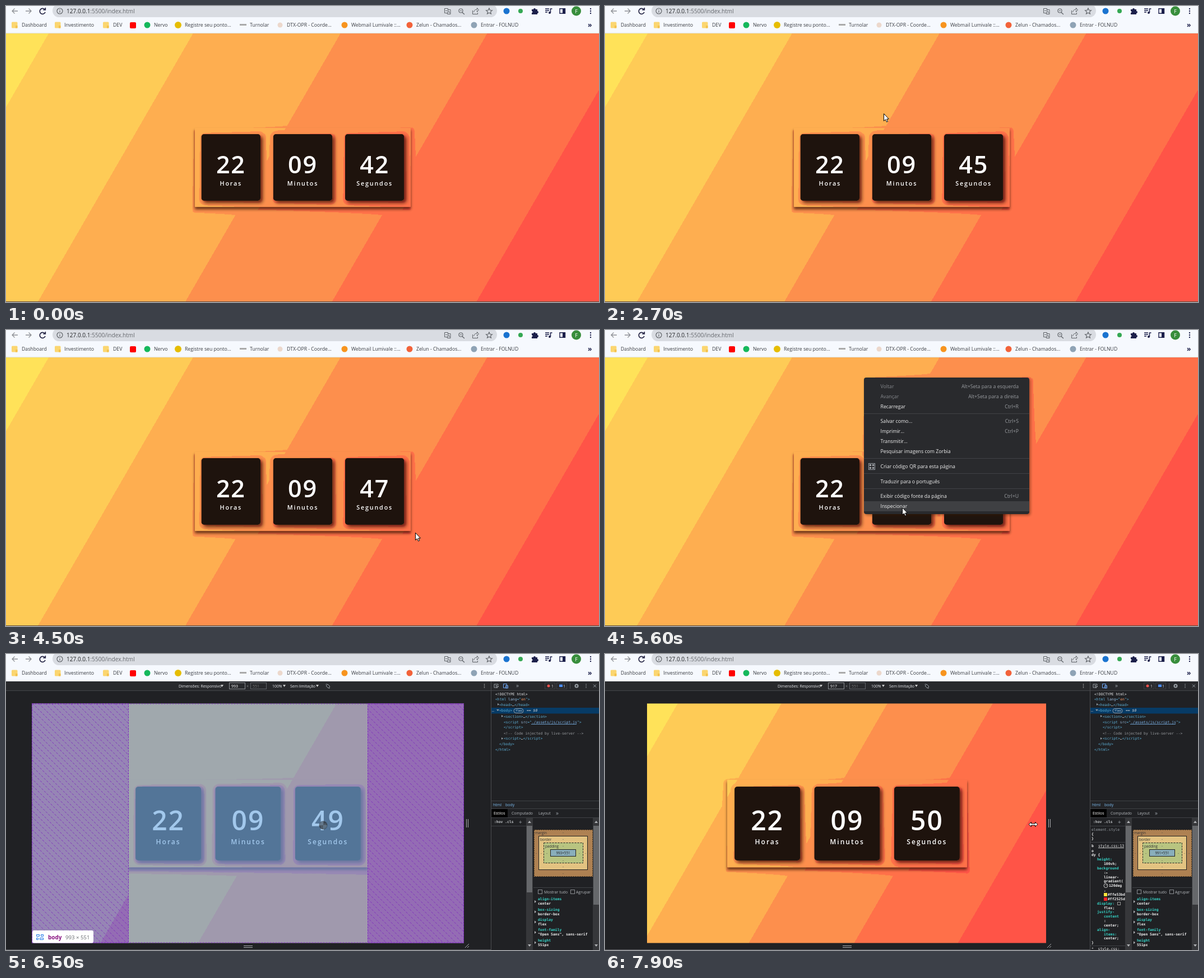
Animation, 1058 px wide and 529 px high, one loop 8000 ms. Source, as an HTML page with a canvas:

```html
<!DOCTYPE html>
<html lang="pt">
<head>
<meta charset="utf-8">
<style>
html, body { margin: 0; width: 100%; height: 100%; overflow: hidden; background: #202124; }
canvas { display: block; }
</style>
</head>
<body>
<canvas id="stage" width="1058" height="529"></canvas>
<script>
const g = document.getElementById('stage').getContext('2d');
const SANS = '"Open Sans", sans-serif', MONO = '"DejaVu Sans Mono", monospace';

// Colour bands of the 120deg gradient: [start, colour]
const PAGE = {
  bands: [[0, '#ffe259'], [.057, '#fecb56'], [.25, '#feae50'], [.447, '#fd8f4d'], [.643, '#ff7049'], [.836, '#ff5447']],
  card: '#1e130d', ink: '#fff', shade: 'rgba(50,18,0,.75)', depth: .17
};
const HIGHLIGHT = {
  bands: [[0, '#a0a8ad'], [.534, '#a099ad'], [.84, '#9788b4']],
  card: '#537598', ink: '#a2c8ec', shade: 'rgba(70,105,145,.6)', depth: .6
};
const SIDES = [[0, '#9685b5'], [.363, '#946cb4']];
const MENU = [462, 85, 295, 244, 4];

// Pointer keys: time, x, y
const POINTER = [
  [300, 12, 3], [1100, 346, 184], [1200, 346, 184], [1300, 349, 184], [1400, 349, 184],
  [2300, 454, 190], [2400, 454, 190], [2700, 497, 192], [3300, 586, 245], [3400, 586, 245],
  [4000, 757, 338], [4100, 758, 330], [4200, 758, 330], [4500, 730, 362], [4600, 730, 362],
  [5200, 531, 324], [5300, 531, 324], [5400, 462, 329], [5600, 530, 317], [6300, 530, 318],
  [6500, 566, 306], [7300, 806, 304], [7400, 806, 304], [7600, 823, 304], [7700, 823, 304], [7900, 764, 304]
];

function text(str, x, y, color, size = 8.7, o = {}) {
  g.font = `${o.weight || 400} ${size}px ${o.font || SANS}`;
  g.textAlign = o.align || 'left';
  g.letterSpacing = (o.spacing || 0) + 'px';
  g.fillStyle = color;
  g.fillText(str, x, y);
  return x + g.measureText(str).width;
}
const code = (x, y, ...parts) => {
  for (let i = 0; i < parts.length; i += 2) x = text(parts[i + 1], x, y + 2.3, parts[i], 6.4, { font: MONO });
};
const bold = (str, x, y, color) => text(str, x, y + 2.3, color, 6.4, { font: MONO, weight: 700 });
const rect = (x, y, w, h, color) => { g.fillStyle = color; g.fillRect(x, y, w, h); };
const frame = (x, y, w, h, color, dash = []) => {
  g.setLineDash(dash); g.lineWidth = 1; g.strokeStyle = color;
  g.strokeRect(x + .5, y + .5, w - 1, h - 1); g.setLineDash([]);
};
const round = (x, y, w, h, r, color) => {
  g.beginPath(); g.roundRect(x, y, w, h, r); g.fillStyle = color; g.fill();
};
const dot = (x, y, r, color) => round(x - r, y - r, 2 * r, 2 * r, r, color);
const line = (d, color, width = 1) => { g.strokeStyle = color; g.lineWidth = width; g.stroke(new Path2D(d)); };
const solid = (d, color) => { g.fillStyle = color; g.fill(new Path2D(d)); };
const dots = (x, y, gap, r, color) => { for (const k of [-1, 0, 1]) dot(x, y + k * gap, r, color); };

function bandFill(v, bands, shift = 0) {
  const len = .866 * v.w + .5 * v.h, clamp = p => Math.min(1, Math.max(0, p - shift));
  const fill = g.createLinearGradient(v.x, v.y, v.x + .866 * len, v.y + .5 * len);
  bands.forEach(([start, color], i) => {
    fill.addColorStop(clamp(start), color);
    fill.addColorStop(clamp(i + 1 < bands.length ? bands[i + 1][0] : 2), color);
  });
  return fill;
}

function outside([x, y, w, h, r], paint) {
  const p = new Path2D();
  p.rect(0, 0, 1058, 529);
  p.roundRect(x, y, w, h, r);
  g.save();
  g.clip(p, 'evenodd');
  paint();
  g.restore();
}

// The bands creep forward near a box, as if darkened by a soft shadow.
function halo(v, bands, box, dx, dy, depth) {
  const [x, y, w, h, r] = box;
  outside(box, () => {
    for (let k = 1; k <= 10; k++) {
      const e = 10 - k;
      round(x + dx - e, y + dy - e, w + 2 * e, h + 2 * e, r + e, bandFill(v, bands, depth * (k / 10) ** 1.5));
    }
  });
}

function shadow(box, dx, dy, blur, color) {
  const [x, y, w, h, r] = box, away = 2000;
  outside(box, () => {
    g.shadowColor = color; g.shadowBlur = blur;
    g.shadowOffsetX = dx + away; g.shadowOffsetY = dy;
    round(x - away, y, w, h, r, '#000');
  });
}

function clock(v, theme, s, cx, cy, sec) {
  g.save();
  g.beginPath(); g.rect(v.x, v.y, v.w, v.h); g.clip();
  const w = 117 * s, h = 132 * s, pitch = 142.4 * s, top = cy - h / 2;
  const cw = 428 * s, ch = 157 * s, panel = [cx - cw / 2, cy - ch / 2, cw, ch, 1];
  halo(v, theme.bands, panel, 0, 6 * s, theme.depth);
  shadow(panel, 0, 4, 5, theme.shade);
  [['22', 'Horas'], ['09', 'Minutos'], [String(sec), 'Segundos']].forEach(([num, label], i) => {
    const mid = cx + (i - 1) * pitch, o = { weight: 600, align: 'center', spacing: 2 * s };
    const card = [mid - w / 2, top, w, h, 5 * s];
    halo(v, theme.bands, card, 2, 2, theme.depth * 1.6);
    shadow(card, 4, 4, 6, theme.shade);
    round(...card, theme.card);
    text(num, mid, top + 77.7 * s, theme.ink, 48 * s, o);
    text(label, mid, top + 102.5 * s, theme.ink, 12 * s, o);
  });
  g.restore();
}

function toolbar() {
  const dark = '#1b1f4a', gray = '#5f6368';
  rect(0, 0, 1058, 49, '#f6f9fe');
  rect(0, 48, 1058, 1, '#dfe2e8');
  round(83, -3, 793, 23, 11.5, '#d9dce2');
  line('M21 9H11M15.5 4.5 11 9l4.5 4.5M35 9H45M40.5 4.5 45 9l-4.5 4.5', '#8d9095', 1.3);
  line('M69 6A5 5 0 1 0 70 11M70.3 3v4h-4', '#202040', 1.7);
  line('M101 9a5 5 0 1 0-10 0a5 5 0 1 0 10 0M96 8.5v3.3M96 6v1.2', gray, 1.2);
  text(':5500/index.html', text('127.0.0.1', 108, 13, '#26282b', 10.05), 13, '#66696e', 10.05);
  line('M782.5 4.5h6v8h-6zM788.5 6.5h4.5v8h-5.5l-1-2M784 8.5h3M790 9l2 4', gray);
  line('M815 8.5a3.5 3.5 0 1 0-7 0a3.5 3.5 0 1 0 7 0M814 11.5l4 3.5M810 8.5h3', gray, 1.2);
  line('M832.5 8v6.5h9V12M834.5 11q1-5 6-5V3.5l3 3.5-3 3.5V8', gray);
  line('M862 4l1.6 3.5 3.8.4-2.9 2.5.9 3.7-3.4-2-3.4 2 .9-3.7-2.9-2.5 3.8-.4z', gray, 1.2);
  dot(893, 9, 5.5, '#1a73d0');
  dot(918, 9, 4, '#34a853');
  solid('M938 6h3a2 2 0 1 1 4 0h3v3a2 2 0 1 1 0 4v2h-10v-3a1.5 1.5 0 1 0 0-3z', dark);
  line('M962 5h7M962 8h7M962 11h4M971.5 12V5h3', dark, 1.5);
  dot(970, 12, 2, dark);
  line('M988 4.7h9.5v8.6h-9.5z', dark, 1.4);
  rect(993, 4, 5, 10, dark);
  dot(1017.5, 9, 8.5, '#388e3c');
  text('F', 1017.5, 12.5, '#fff', 9.5, { align: 'center' });
  dots(1043, 9, 4, 1.2, dark);

  for (const x of [10, 87, 173]) {
    round(x, 28.5, 10.5, 11, 1.5, '#fbd670');
    rect(x + 7, 35, 3.5, 4.5, '#f3c14d');
  }
  round(221, 29, 11, 11, 2, '#f00');
  dot(252, 34, 5.5, '#15b85c');
  dot(307, 34, 6, '#e6bd00');
  rect(417, 32, 12, 3, '#aaa');
  dot(489, 34, 4.5, '#ecd8cc');
  dot(604, 34, 5.5, '#f7941e');
  dot(720, 34, 5.5, '#f2623a');
  dot(835, 34, 5.5, '#8fa3b5');
  [['Dashboard', 28], ['Investimento', 104], ['DEV', 191], ['Nervo', 264], ['Registre seu ponto...', 319],
   ['Turnolar', 435], ['DTX-OPR - Coorde...', 501], ['Webmail Lumivale ::...', 616],
   ['Zelun - Chamados...', 732], ['Entrar - FOLNUD', 847]].forEach(([s, x]) => text(s, x, 37, '#3a3d42'));
  text('»', 1038, 38, dark, 12, { weight: 700 });
}

function menu() {
  shadow(MENU, 2, 2, 5, 'rgba(60,25,0,.5)');
  round(...MENU, '#292a2d');
  rect(462, 306, 295, 18, '#3f4043');
  for (const y of [149, 229, 256, 283]) rect(462, y, 295, 1, '#414246');
  [['Voltar', 101, 'Alt+Seta para a esquerda'], ['Avançar', 119, 'Alt+Seta para a direita'],
   ['Recarregar', 137, 'Ctrl+R'], ['Salvar como...', 163, 'Ctrl+S'], ['Imprimir...', 181, 'Ctrl+P'],
   ['Transmitir...', 199], ['Pesquisar imagens com Zorbia', 217], ['Criar código QR para esta página', 244],
   ['Traduzir para o português', 271], ['Exibir código fonte da página', 297, 'Ctrl+U'], ['Inspecionar', 315]
  ].forEach(([label, y, keys = '']) => {
    text(label, 491.5, y + 3, y < 130 ? '#85888c' : '#f1f1f1', 8.75);
    text(keys, 738, y + 3, '#9a9da1', 8.75, { align: 'right' });
  });
  frame(470, 238, 12, 12, '#9aa0a6');
  for (const x of [472, 477]) for (const y of [240, 245]) frame(x, y, 3, 3, '#bdc1c6');
}

function deviceBar(v, width) {
  const ink = '#e8eaed', right = v.x + v.w;
  rect(0, 49, 1058, 480, '#202124');
  rect(0, 49, 1058, 16, '#28292c');
  rect(0, 65, 1058, 1, '#44464a');
  rect(865, 49, 1, 480, '#4a4c50');
  text('Dimensões: Responsivo', 308, 59.5, ink, 6.9);
  text('100%', 475, 59.5, ink, 6.9);
  text('Sem limitação', 507, 59.5, ink, 6.9);
  for (const x of [383, 494, 553]) solid(`M${x} 55h5l-2.5 4z`, '#ccc');
  frame(398, 51, 29, 12, '#8a8d91');
  frame(436, 51, 29, 12, '#5f6368');
  text(width, 402, 59.5, '#fff', 6.9);
  text('×', 429, 59.5, '#888', 6.9);
  text('551', 440, 59.5, '#777', 6.9);
  line('M571 57l3-3 4 4-3 3zM570.5 55l2-2M578 60l-2 2', '#9aa0a6');
  dots(853.5, 57, 2.8, .8, '#bbb');
  line(`M${right + 4.5} 295v15M${right + 7.5} 295v15M424 521.5h16M424 524.5h16`, '#a9abae');
  line(`M${right + 2} 525l7-7M${right + 6} 525l3-3`, '#a9abae');
  rect(0, 528, 865, 1, '#55575b');
}

function inspector(loaded) {
  const ink = '#e8eaed', icon = '#9aa0a6';
  line('M877 60h-6v-6h7v2M874 56l5 2-2 .8-1 2z', icon);
  line('M887.5 53.5h6v7h-6zM891.5 56.5h4v4.5h-4z', '#6ea8f7');
  dot(1018, 57, 3.5, icon); dot(1018, 57, 1.5, '#28292c');
  dots(1035, 57, 2.8, .8, icon);
  line('M1048 54.5l5 5M1053 54.5l-5 5', icon);
  if (!loaded) {
    rect(906, 49, 45, 16, '#000');
    text('Elementos', 912, 59.5, ink, 6.8);
    text('»', 956, 60, icon, 10);
    return;
  }
  text('»', 910, 60, icon, 10);
  frame(961, 51, 19, 12, '#3c4043'); dot(968, 57, 2.5, '#f0524d'); text('1', 973, 59.5, ink, 6.8);
  frame(982, 51, 19, 12, '#3c4043'); rect(987, 54.5, 6, 4.5, '#4c8df6'); text('1', 994, 59.5, ink, 6.8);
  rect(1006, 52, 1, 10, '#4a4c50');

  const tag = '#5db0d7', attr = '#9bbbdc', str = '#f29766', link = '#7fb8f0';
  rect(866, 96, 192, 10.5, '#073b66');
  code(873, 72, ink, '<!DOCTYPE html>');
  code(873, 81, tag, '<html ', attr, 'lang', tag, '="', str, 'en', tag, '">');
  code(880, 91, tag, '<head>', ink, '…', tag, '</head>');
  code(867, 101, '#aaa', '…');
  code(880, 101, tag, '<body>');
  g.beginPath(); g.roundRect(906, 97.5, 17, 8, 4); g.strokeStyle = '#9aa0a6'; g.stroke();
  text('flex', 909, 103.3, ink, 5, { font: MONO });
  text('== $0', 929, 103.3, '#d0d4d8', 6.4, { font: MONO, weight: 'italic' });
  code(888, 112, tag, '<section>', ink, '…', tag, '</section>');
  code(888, 122, tag, '<script ', attr, 'src', tag, '="', link, './assets/js/script.js', tag, '">');
  rect(937, 125, 81, .8, link);
  code(888, 131, tag, '</' + 'script>');
  code(888, 142, '#9a9da1', '<!-- Code injected by live-server -->');
  code(888, 151, tag, '<script>', ink, '…', tag, '</' + 'script>');
  code(880, 161, tag, '</body>');
  code(873, 171, tag, '</html>');
  for (const [x, y] of [[877, 90], [884, 111], [884, 151]]) solid(`M${x} ${y - 2}l3 2-3 2z`, icon);
  solid('M875 99h5l-2.5 3z', icon);

  rect(866, 262, 192, 14, '#232427');
  for (const y of [262, 276, 292]) rect(866, y, 192, 1, '#3f4145');
  text('html', 869, 272, '#7cbcf0', 7);
  text('body', 891, 272, '#7cbcf0', 7);
  rect(866, 277, 29, 15, '#000');
  text('Estilos', 870, 287, '#fff', 6.9);
  text('Computado', 902, 287, '#b4b8bc', 6.9);
  text('Layout', 950, 287, '#b4b8bc', 6.9);
  text('»', 981, 288, icon, 10);
  bold(':hov .cls', 871, 300, '#c4c7ca');
  text('+', 915, 304, icon, 10);
  rect(866, 307, 62, 1, '#3f4145');
  for (const [x, top, end] of [[928, 307, 426], [1047, 307, 448]]) {
    rect(x, 293, 12, 236, '#36373a');
    rect(x + 1, top, 10, end - top, '#66686b');
    solid(`M${x + 3} 302l3-4 3 4zM${x + 3} 519l3 4 3-4z`, '#b0b2b5');
  }
}

function boxModel(width) {
  rect(942, 314, 105, 84, '#ae8152'); frame(942, 314, 105, 84, '#4b3720', [2, 2]);
  rect(950, 325, 88, 61, '#e3c381'); frame(950, 325, 88, 61, '#222');
  rect(959, 337, 71, 37, '#b8c480'); frame(959, 337, 71, 37, '#222', [3, 2]);
  rect(971, 349, 46, 13, '#89aebb'); frame(971, 349, 46, 13, '#222');
  text('margin', 944, 322, '#333', 6.3);
  text('border', 953, 334, '#333', 6.3);
  text('padding', 962, 346, '#333', 6.3);
  text(width + '×551', 994, 357.8, '#222', 6.3, { align: 'center' });
  for (const [x, y] of [[994, 321], [994, 333], [994, 345], [994, 371], [994, 382], [994, 394], [946, 358],
    [955, 358], [965, 358], [1023, 358], [1034, 358], [1042, 358]]) text('-', x, y, '#444', 6.3, { align: 'center' });
  rect(941, 417, 106, 1, '#3f4145');
  frame(949, 421, 8, 8, '#8a8d91'); text('Mostrar tudo', 960, 428, '#b4b8bc', 6.9);
  frame(1007, 421, 8, 8, '#8a8d91'); text('Agrupar', 1017, 428, '#b4b8bc', 6.9);
  [['align-items', 'center'], ['box-sizing', 'border-box'], ['display', 'flex'],
   ['font-family', '"Open Sans", sans-serif'], ['height', '551px']].forEach(([name, value], i) => {
    const y = 438 + i * 18.3;
    bold(name, 949, y, '#35d4c7');
    bold(value, 949, y + 8, '#f0f0f0');
    solid(`M943 ${y + 2}l3 2.5-3 2.5z`, '#b0b2b5');
  });
}

function styles() {
  const name = '#35d4c7', ink = '#f0f0f0';
  g.save();
  g.beginPath(); g.rect(866, 308, 62, 221); g.clip();
  rect(866, 336, 62, 1, '#3f4145');
  rect(866, 521, 62, 1, '#3f4145');
  code(868, 314, '#9aa0a6', 'element.style');
  bold('{', 868, 322, ink);
  bold('}', 868, 330, ink);
  bold('b', 868, 343, ink);
  code(880, 343, ink, 'style.css:13');
  rect(880, 346, 46, .8, ink);
  [['o', 868, ink], ['dy {', 868, ink], ['height:', 878, name], ['100vh;', 890, ink],
   ['background', 878, name], [':▸', 890, ink], ['linear-', 890, ink], ['gradient(', 890, ink], ['120deg', 899, ink],
   [',', 890, ink], ['#ffe53bd', 897, ink], ['#ff2525d', 897, ink], ['display:', 878, name], ['flex;', 890, ink],
   ['justify-', 878, name], ['content', 890, name], [':', 890, ink], ['center;', 890, ink], ['align-', 878, name],
   ['items:', 890, name], ['center;', 890, ink], ['}', 868, ink]
  ].forEach(([str, x, color], i) => bold(str, x, 351.3 + i * 7.84, color));
  code(868, 527, ink, '*  style.css:');
  line('M897 414a3.5 3.5 0 1 0-7 0a3.5 3.5 0 1 0 7 0M893.5 414l2-2', '#ccc');
  rect(890, 427, 6, 6, '#ffe53b');
  rect(890, 435, 6, 6, '#ff2525');
  frame(914, 443, 6, 6, '#999');
  g.restore();
}

function flexOverlay(v) {
  const left = 219, right = 645, end = v.x + v.w, purple = '#8030bd';
  for (const [a, b] of [[v.x, left], [right, end]]) {
    rect(a, v.y, b - a, v.h, bandFill(v, SIDES));
    g.save();
    g.beginPath(); g.rect(a, v.y, b - a, v.h); g.clip();
    g.beginPath();
    for (let x = a - v.h; x < b; x += 11.3) { g.moveTo(x, v.y); g.lineTo(x + v.h, v.y + v.h); }
    g.setLineDash([4, 2.5]); g.lineWidth = 1; g.strokeStyle = purple; g.stroke();
    g.restore();
    frame(a, v.y, b - a, v.h, purple, [3, 2]);
  }
  frame(v.x, v.y, v.w, v.h, purple, [3, 2]);
  round(47, 494, 109, 22.5, 3, '#fff');
  line('M54.5 501.5h5v3h-5zM62.5 501.5h4v3h-4zM54.5 507.5h3v3h-3zM60.5 507.5h6v3h-6z', '#1a73e8');
  text('body', 75, 509.5, '#881280', 10, { weight: 700 });
  text('993 × 551', 106, 509.5, '#66696e', 9.6);
}

function pointer(t) {
  if (t < 300) return;
  let i = POINTER.findIndex(k => k[0] > t);
  if (i < 0) i = POINTER.length - 1;
  const [t0, x0, y0] = POINTER[i - 1], [t1, x1, y1] = POINTER[i];
  const f = Math.min(1, (t - t0) / (t1 - t0)), x = x0 + (x1 - x0) * f, y = y0 + (y1 - y0) * f;
  g.save();
  g.translate(Math.round(x), Math.round(y));
  if (t < 6100) {
    const arrow = 'M.5 .5V13.5L3.5 10.8 5.5 15.3 7.6 14.4 5.7 10H9.5z';
    solid(arrow, '#fff'); line(arrow, '#000');
  } else if (t < 6500) {
    line('M8 0A8 8 0 1 0-8 0A8 8 0 1 0 8 0', '#3a332c');
  } else if (t < 7500) {
    dot(0, 0, 7.5, 'rgba(50,55,60,.75)');
    solid('M0 0V-7A7 7 0 0 0-7 0zM0 0V7A7 7 0 0 0 7 0z', 'rgba(120,150,175,.5)');
  } else {
    const arrows = 'M-8 .5l4.5-4v2.5h7v-2.5l4.5 4-4.5 4v-2.5h-7v2.5z';
    solid(arrows, '#fff'); line(arrows, '#000');
  }
  g.restore();
}

function draw(t) {
  const sec = 42 + Math.floor((t + 500) / 1000);
  if (t < 6300) {
    const v = { x: 0, y: 49, w: 1058, h: 480 }, open = t >= 5400 && t < 5800;
    rect(v.x, v.y, v.w, v.h, bandFill(v, PAGE.bands));
    if (open) halo(v, PAGE.bands, MENU, 3, 2, .12);
    clock(v, PAGE, .9, 529.5, 288.5, sec);
    rect(0, 528, 1058, 1, '#5a4a3c');
    if (open) menu();
  } else {
    const width = t < 7800 ? 993 : t < 7900 ? 955 : 917, w = Math.round(width * .7766);
    const v = { x: Math.round(431.3 - w / 2), y: 88.5, w, h: 428 };
    const lit = t >= 6500 && t < 7200, settled = t >= 6400, theme = lit ? HIGHLIGHT : PAGE;
    deviceBar(v, width);
    rect(v.x, v.y, v.w, v.h, bandFill(v, theme.bands));
    clock(v, theme, settled ? 1 : .9, settled ? 432 : 431.5, settled ? 303 : 302.5, sec);
    if (lit) flexOverlay(v);
    inspector(t >= 6500);
    if (t >= 6500) boxModel(t < 7900 ? 993 : 991);
    if (t >= 6700) styles();
  }
  toolbar();
  pointer(t);
}

function tick(now) {
  draw(Math.floor(now % 8000 / 100) * 100);
  requestAnimationFrame(tick);
}
tick(performance.now());
</script>
</body>
</html>
```
